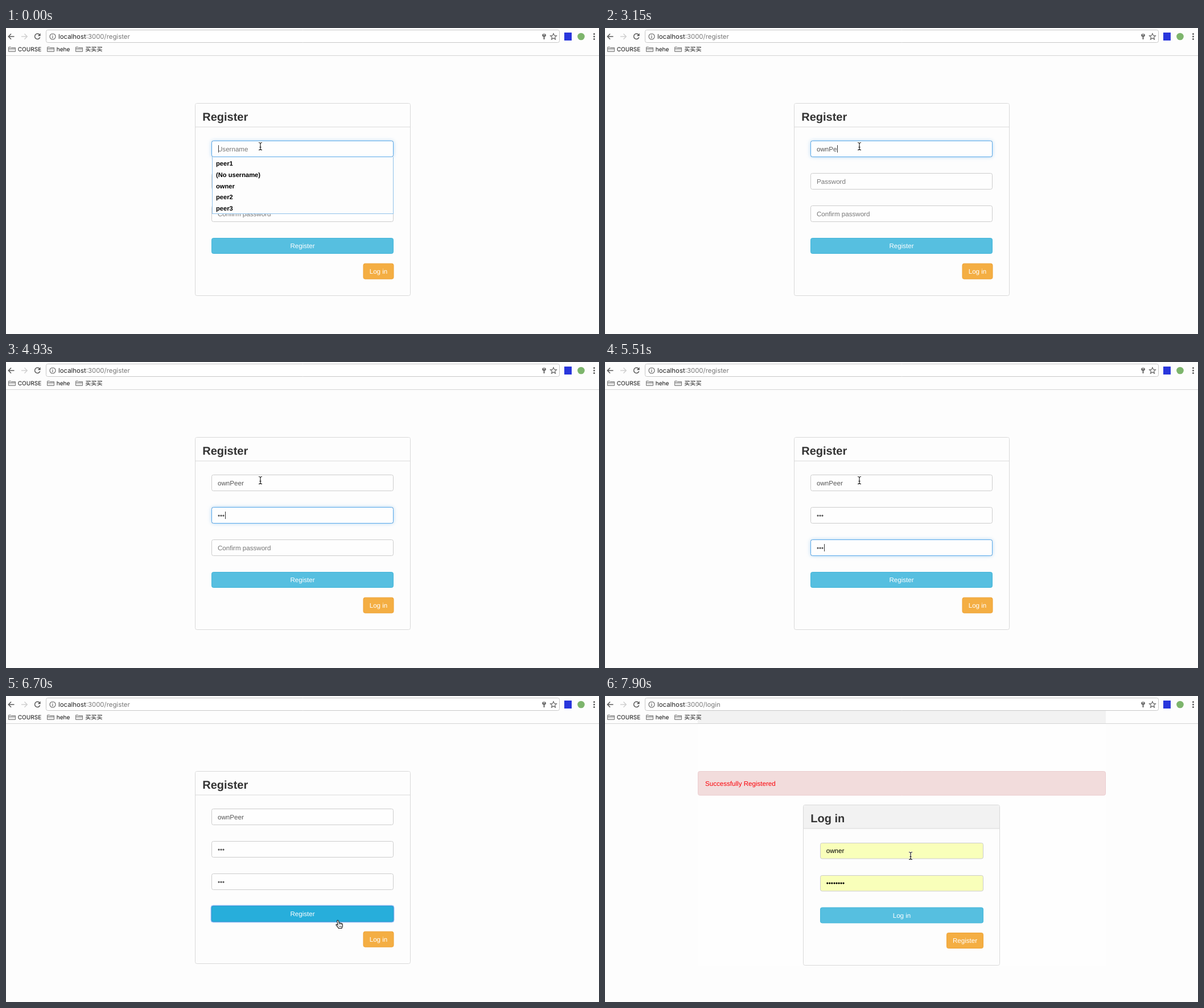
An HTML page with a canvas that plays this animation: 1042x538 px, repeating every 8 s.

```html
<!DOCTYPE html>
<html lang="en">
<head>
<meta charset="utf-8">
<title>Registration form</title>
<style>
  html, body { margin: 0; width: 100%; height: 100%; overflow: hidden; background: #fdfdfd; }
  canvas { display: block; }
</style>
</head>
<body>
<canvas id="stage" width="1042" height="538"></canvas>
<script>
const ctx = document.getElementById('stage').getContext('2d');
const LOOP = 8000;
const PAGE = '#fdfdfd';
const FORM = '"Liberation Sans", Arial, sans-serif';
const CHROME = 'Inter, "Noto Sans CJK SC", sans-serif';
const BODY = `11.6px ${FORM}`;
const TITLE = `bold 20px ${FORM}`;
ctx.textRendering = 'geometricPrecision';

// Each step changes part of the state from its time on.
const steps = [
  [0, { page: 'register', name: '', pass: 0, confirm: 0, focus: 0, glow: 1, caret: true,
        list: true, hover: false, cursor: [beam, 447, 208] }],
  [140, { name: 'ow', list: false }],
  [320, { name: 'own' }],
  [770, { caret: false }],
  [1210, { caret: true }],
  [1810, { caret: false }],
  [1960, { name: 'ownp', caret: true }],
  [2410, { name: 'own' }],
  [2550, { name: 'ownP' }],
  [3150, { name: 'ownPe' }],
  [3290, { name: 'ownPee' }],
  [3440, { name: 'ownPeer' }],
  [3730, { focus: 1, glow: 0.5 }],
  [3880, { glow: 1 }],
  [4330, { pass: 1 }],
  [4480, { pass: 2 }],
  [4930, { pass: 3 }],
  [5070, { focus: 2, glow: 0.5 }],
  [5220, { confirm: 1, glow: 1 }],
  [5360, { confirm: 2 }],
  [5510, { confirm: 3 }],
  [5960, { caret: false }],
  [6110, { cursor: [arrow, 470, 240] }],
  [6250, { cursor: [beam, 520, 318] }],
  [6400, { cursor: [hand, 565, 376], hover: true, caret: true }],
  [6550, { cursor: [hand, 583, 395] }],
  [6700, { focus: 3 }],
  [6850, { page: 'login', hover: false }],
  [7450, { cursor: [hand, 582, 393], hover: true }],
  [7600, { cursor: [hand, 571, 374] }],
  [7750, { cursor: [arrow, 549, 306], hover: false }],
  [7900, { cursor: [beam, 537, 281] }],
];

function stateAt(t) {
  return Object.assign({}, ...steps.filter(([start]) => start <= t).map(([, change]) => change));
}

function rect(x, y, w, h, color) {
  ctx.fillStyle = color;
  ctx.fillRect(x, y, w, h);
}

function box(x, y, w, h, fill, stroke, radius = 3) {
  ctx.beginPath();
  ctx.roundRect(x, y, w, h, radius);
  ctx.fillStyle = fill;
  ctx.fill();
  if (stroke) {
    ctx.strokeStyle = stroke;
    ctx.lineWidth = 1;
    ctx.stroke();
  }
}

function text(str, x, y, color, font = BODY, align = 'left') {
  ctx.font = font;
  ctx.fillStyle = color;
  ctx.textAlign = align;
  ctx.fillText(str, x, y);
}

function line(path, color, width = 1, fill) {
  const shape = new Path2D(path);
  if (fill) {
    ctx.fillStyle = fill;
    ctx.fill(shape);
  }
  ctx.strokeStyle = color;
  ctx.lineWidth = width;
  ctx.stroke(shape);
}

function disc(x, y, r, color) {
  ctx.beginPath();
  ctx.arc(x, y, r, 0, 7);
  ctx.fillStyle = color;
  ctx.fill();
}

// Mouse pointers, drawn around their hot spot.
function beam() {
  const path = 'M-3 -6.5Q-.5 -6.5 0 -5Q.5 -6.5 3 -6.5M0 -5V5M-3 6.5Q-.5 6.5 0 5Q.5 6.5 3 6.5M-1.5 1.5H1.5';
  line(path, '#fff', 2.6);
  line(path, '#111', 1.1);
}

function arrow() {
  line('M0 0V12.5L2.9 9.8L4.8 14.2L6.8 13.3L4.9 9H8.9Z', '#fff', 1, '#000');
}

function hand() {
  line('M-1.2 1Q-1.4 -.8 0 -.8Q1 -.8 1.4 .8L2.2 4.2Q3.3 3.2 4.3 4.5Q5.6 3.8 6.3 5.1' +
    'Q7.8 4.7 8.2 6.4L8.5 9.2Q8.3 11 7.3 12L7 13.5H1.2L.7 12Q-1 10.6 -2 8.8' +
    'Q-3.6 7.4 -2.7 6.6Q-1.6 6 0 7.7Z', '#111', 1.1, '#fff');
  line('M2.3 4.2L2.8 7M4.4 4.6L4.8 7M6.4 5.2L6.6 7.2M2.8 9V11.5M4.6 9V11.5M6.3 9V11.5', '#111', 0.7);
}

function folder(x) {
  line(`M${x + 0.5} 41.5V34Q${x + 0.5} 33.5 ${x + 1} 33.5H${x + 4.5}L${x + 5.5} 34.5H${x + 12.5}V41.5Z` +
    `M${x + 0.5} 36.5H${x + 12.5}`, '#777', 1, '#e6e6e6');
}

function browser(path, tinted) {
  if (tinted) rect(163, 26, 717, 22, '#f2f2f2');
  rect(0, 48, 1042, 1, '#d4d4d4');
  box(70.5, 3.5, 902, 22, '#fff', '#c8c8c8');

  line('M14.5 15H4.5M9 10.3L4.3 15L9 19.7', '#5a5a5a', 1.5);
  line('M27 15H37M32.5 10.3L37.2 15L32.5 19.7', '#d0d0d0', 1.5);
  line('M59 12A4.7 4.7 0 1 0 59.7 16.3', '#5a5a5a', 1.5);
  line('M60.5 9.5V14H56Z', '#5a5a5a', 0.3, '#5a5a5a');
  line('M87 15A5 5 0 1 0 77 15A5 5 0 1 0 87 15M82 14V18M82 11.8V13', '#5a5a5a', 1.1);

  const font = `11.4px ${CHROME}`;
  text('localhost', 92, 19, '#222', font);
  text(path, 92 + ctx.measureText('localhost').width, 19, '#777', font);

  box(942.2, 10.3, 6.6, 5, '#666', null, 2);
  rect(944.5, 15, 2, 5, '#666');
  rect(944.2, 11.4, 2.6, 1.2, '#fff');
  line('M962 9.6L963.6 13.3L967.5 13.6L964.5 16.2L965.5 20L962 18L958.5 20L959.5 16.2L956.5 13.6L960.4 13.3Z',
    '#5a5a5a', 1.1);
  rect(981, 8, 13, 14, '#2936dc');
  disc(1010.5, 15, 6.3, '#7db56c');
  for (const y of [10.5, 15, 19.5]) disc(1033.5, y, 1.5, '#5a5a5a');

  [[4, 'COURSE'], [72, 'hehe'], [122.5, '买买买']].forEach(([x, label]) => {
    folder(Math.floor(x));
    text(label, x + 16.7, 41.3, '#111', `10.1px ${CHROME}`);
  });
}

function panel(x, y, w, h, title, heading) {
  box(x, y, w, h, PAGE, '#d9d9d9');
  box(x + 0.5, y + 0.5, w - 1, 41, heading, null, [3, 3, 0, 0]);
  rect(x, y + 41, w, 1, '#d9d9d9');
  text(title, x + 12.7, y + 30, '#333', TITLE);
}

function button(x, y, w, label, fill, stroke) {
  box(x, y, w, 27, fill, stroke);
  text(label, x + w / 2, y + 17.7, '#fff', BODY, 'center');
}

function infoButton(x, y, w, label, hover) {
  button(x, y, w, label, hover ? '#27aedb' : '#56bfe0', hover ? '#269fcb' : '#43b5d9');
}

function field(y, value, hint, glow, caret) {
  ctx.save();
  if (glow) {
    ctx.shadowColor = `rgba(102,175,233,${0.6 * glow})`;
    ctx.shadowBlur = 6;
  }
  box(361.5, y, 319, 28, '#fefefe');
  ctx.restore();
  box(361.5, y, 319, 28, '#fefefe', '#ccc');
  if (glow) box(361.5, y, 319, 28, 'transparent', `rgba(90,170,235,${glow})`);
  text(value || hint, 372, y + 18.2, value ? '#555' : '#777');
  if (caret) rect(Math.floor(372 + ctx.measureText(value).width) + 1, y + 7.5, 1, 13, '#333');
}

function suggestions() {
  rect(362, 227, 319, 100, '#8fc1ea');
  rect(363, 227, 317, 99, PAGE);
  ['peer1', '(No username)', 'owner', 'peer2', 'peer3'].forEach((item, i) =>
    text(item, 369, 242 + i * 19.75, '#000', `bold 11.15px ${FORM}`));
}

function registerPage(s) {
  panel(332.5, 132.5, 378, 338, 'Register', PAGE);
  const fields = [
    [s.name, 'Username'],
    ['•'.repeat(s.pass), 'Password'],
    ['•'.repeat(s.confirm), 'Confirm password'],
  ];
  fields.forEach(([value, hint], i) => {
    const focused = i === s.focus;
    const glow = focused ? s.glow : i === s.focus - 1 ? 1 - s.glow : 0;
    field(198.5 + i * 57, value, hint, glow, focused && s.caret);
  });
  if (s.list) suggestions();
  if (s.focus === 3) box(360, 368, 322, 30, '#5c9df0', '#a9cdf6', 4);
  infoButton(361.5, 369.5, 319, 'Register', s.hover);
  button(628, 414.2, 53, 'Log in', '#f4ae43', '#eea236');
}

function loginPage(s) {
  rect(163, 49, 717, 425, '#fefefe');
  box(163.5, 132.5, 716, 42, '#f2dcdc', '#ebcccf');
  text('Successfully Registered', 176, 157.6, '#fb0007');
  panel(348.5, 191.5, 345, 282, 'Log in', '#f2f2f2');
  ['owner', '•'.repeat(8)].forEach((value, i) => {
    const y = 258.5 + i * 57;
    box(378.5, y, 286, 27.5, '#f9ffba', '#ccc');
    text(value, 388.7, y + 17.8, '#000');
  });
  infoButton(378.5, 372, 286, 'Log in', s.hover);
  button(600.5, 416.5, 64, 'Register', '#f4ae43', '#eea236');
}

function draw(now) {
  const s = stateAt(now % LOOP);
  const login = s.page === 'login';
  rect(0, 0, 1042, 538, PAGE);
  browser(login ? ':3000/login' : ':3000/register', login);
  (login ? loginPage : registerPage)(s);

  const [pointer, x, y] = s.cursor;
  ctx.save();
  ctx.translate(x, y);
  pointer();
  ctx.restore();
}

const start = performance.now();
function tick() {
  draw(performance.now() - start);
  requestAnimationFrame(tick);
}
tick();
</script>
</body>
</html>
```
